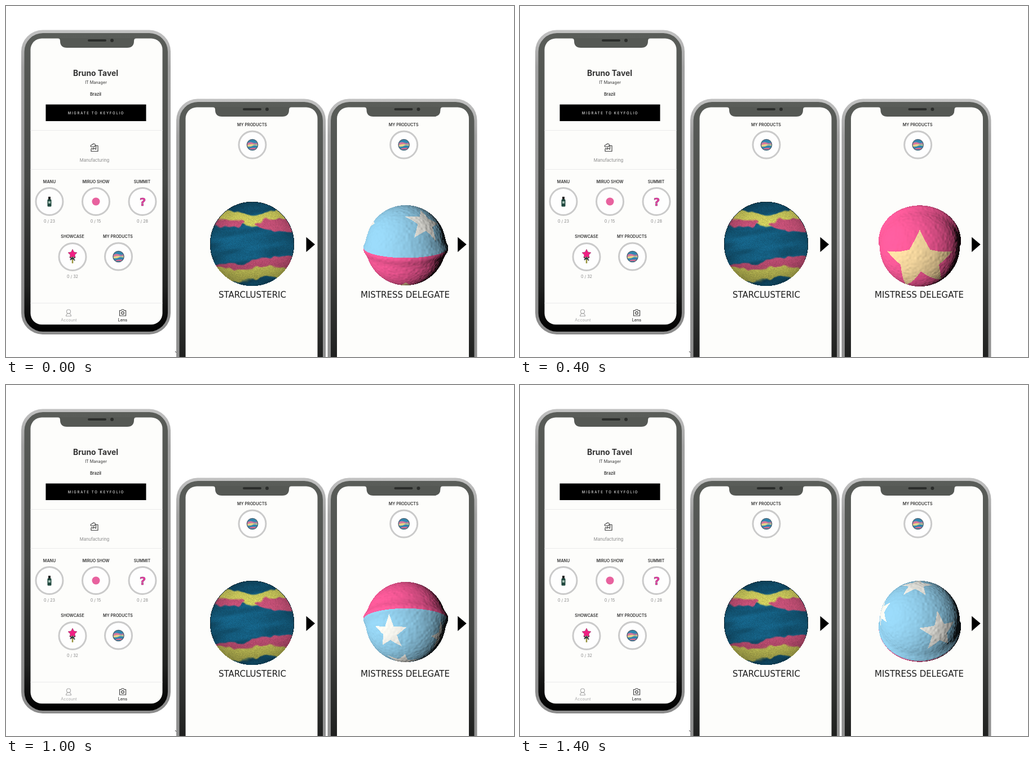
Recreate the animation shown at these times as an HTML page with a canvas. Size 901 by 622 pixels, loop 1600 ms.

```html
<!DOCTYPE html>
<html lang="en">
<head>
<meta charset="utf-8">
<title>Product lens</title>
<style>
html, body { margin: 0; width: 100%; height: 100%; overflow: hidden; background: #fff; }
svg, canvas, .window { position: absolute; left: 0; top: 0; }
text { font-family: Inter, Roboto, sans-serif; text-anchor: middle; fill: #333; font-size: 7.2px; }
.cap { font-weight: 600; font-size: 7.1px; }
.dim { fill: #888; }
.pale { fill: #aaa; }
.big { font: 15px "DejaVu Sans", sans-serif; fill: #1c1c1c; }
.ring { fill: #fefefe; stroke: #cacaca; stroke-width: 3; }
.rule { stroke: #ebebeb; }
.line { fill: none; stroke: #444; stroke-width: 1.2; stroke-linejoin: round; }
#still { left: 361px; top: 346px; }
.window { left: 629px; top: 341px; width: 160px; height: 160px; overflow: hidden; }
#strip { animation: spin 1.6s steps(8) infinite; }
@keyframes spin { to { transform: translateX(-1280px); } }
</style>
</head>
<body>
<svg width="901" height="622" viewBox="0 0 901 622">
  <defs>
    <linearGradient id="rim" x2="0" y2="1">
      <stop offset="0" stop-color="#c2c2c2"/><stop offset=".12" stop-color="#a2a2a2"/>
      <stop offset="1" stop-color="#8c8c8c"/>
    </linearGradient>
    <linearGradient id="body" x2="0" y2="1">
      <stop offset="0" stop-color="#5a5d59"/><stop offset=".5" stop-color="#454745"/>
      <stop offset=".85" stop-color="#202120"/><stop offset="1" stop-color="#000"/>
    </linearGradient>
    <g id="phone">
      <rect x="27" y="42.5" width="265" height="539.5" rx="38" fill="url(#rim)"/>
      <rect x="32.5" y="48" width="254.5" height="529" rx="33" fill="url(#body)"/>
      <rect x="43.500" y="57.500" width="234" height="507" rx="20" fill="#fdfdfb"/>
      <path d="M92 57H231Q227 57.500 227 62Q227 74 215 74H108Q96 74 96 62Q96 57.500 92 57Z" fill="#555854"/>
      <rect x="145" y="59" width="33" height="4" rx="2" fill="#2b2d2b"/>
      <circle cx="188" cy="61" r="3" fill="#2b2d2b"/>
    </g>
    <clipPath id="disc"><circle r="9.5"/></clipPath>
    <g id="mini">
      <circle class="ring" r="24"/>
      <g clip-path="url(#disc)">
        <rect x="-10" y="-10" width="20" height="20" fill="#3187b0"/>
        <path d="M-10-2Q-5-6 0-4T10-4V-1Q4-2 0-1T-10 1Z" fill="#d9789c"/>
        <path d="M-10 1Q-3-2 1-1T10-1V2Q3 0 0 2T-10 3Z" fill="#e3d58a"/>
        <path d="M-5 6.500Q0 4.500 7 5.500L5 8H-4Z" fill="#d0688f"/>
      </g>
      <circle r="9.7" fill="none" stroke="#4a6072" stroke-width="1.3"/>
    </g>
    <g id="shop">
      <text class="cap" x="436.5" y="213">MY PRODUCTS</text>
      <use href="#mini" x="437" y="246"/>
      <path d="M532.500 409.500L548 422.500L532.500 436Z"/>
    </g>
  </defs>

  <use href="#phone"/>
  <use href="#phone" x="275" y="122"/>
  <use href="#phone" x="543.5" y="122"/>
  <path d="M300 612L302 614" stroke="#222"/>

  <text x="159" y="124" style="font-size:13.85px;font-weight:700">Bruno Tavel</text>
  <text x="159.5" y="137.5" fill="#555">IT Manager</text>
  <text x="159" y="158.5" style="font-size:7.4px;font-weight:600">Brazil</text>
  <rect x="70.500" y="174.500" width="178" height="29.500"/>
  <text x="160" y="191.5" style="font-size:6px;letter-spacing:1.7px;fill:#ddd;font-weight:500">MIGRATE TO KEYFOLIO</text>
  <path class="rule" d="M43.500 220.500H277.500M43.500 289.500H277.500M43.500 526.500H277.500"/>
  <path class="line" d="M151 253V257.500H163V247.500H159.500V254L155 251.500V254L151 252M150.500 249.500Q149.500 246 153 246Q155 242.500 158.500 245.500M150.500 249.500H155Q158 249 159 246"/>
  <text class="dim" x="157" y="276" style="font-size:7.6px">Manufacturing</text>

  <text class="cap" x="77" y="313.5">MANU</text>
  <text class="cap" x="159.5" y="313.5">MIRUO SHOW</text>
  <text class="cap" x="241.5" y="313.5">SUMMIT</text>
  <circle class="ring" cx="77" cy="346.5" r="24"/>
  <circle class="ring" cx="159.5" cy="346.5" r="24"/>
  <circle class="ring" cx="242" cy="346.5" r="24"/>
  <rect x="75" y="338" width="4" height="5" fill="#222"/>
  <rect x="73.500" y="342.500" width="7" height="13" rx="1.5" fill="#20483f"/>
  <rect x="75" y="346" width="4" height="4" fill="#9dbbae"/>
  <circle cx="159.500" cy="346.500" r="7" fill="#e8629f"/>
  <text x="242.500" y="353.500" style="font:bold 20px 'DejaVu Sans',sans-serif;fill:#e93ba3;stroke:#7d3b68;stroke-width:.5px">?</text>
  <text class="dim" x="77" y="384">0 / 23</text>
  <text class="dim" x="159" y="384">0 / 15</text>
  <text class="dim" x="242" y="384">0 / 28</text>

  <text class="cap" x="118" y="411">SHOWCASE</text>
  <text class="cap" x="198.5" y="411">MY PRODUCTS</text>
  <circle class="ring" cx="118" cy="444.5" r="24"/>
  <use href="#mini" x="199.5" y="444"/>
  <path d="M118 442V456" stroke="#99953f" stroke-width="2.5"/>
  <path d="M113 445L118 448L123 445M114 450L118 446L122 451" fill="none" stroke="#343a40" stroke-width="2"/>
  <path d="M118 431L120.500 436L126 437L122 441L123 446L118 444L113 446L114 441L110 437L115.500 436Z" fill="#f01f83" stroke="#7a2350" stroke-width=".5"/>
  <text class="dim" x="118" y="482">0 / 32</text>

  <g class="line" style="stroke:#aaa"><circle cx="111" cy="541.5" r="3.5"/><path d="M106.500 549.500Q107 545 111 545T115.500 549.500Z"/></g>
  <g class="line"><path d="M201.500 539.500H204.500L205.500 538H208.500L209.500 539.500H212.500V549H201.500Z"/><circle cx="207" cy="544" r="2.3"/></g>
  <text class="pale" x="111.5" y="559">Account</text>
  <text x="207" y="559" style="font-weight:500">Lens</text>

  <use href="#shop"/>
  <use href="#shop" x="268.7"/>
  <text class="big" x="437" y="517">STARCLUSTERIC</text>
  <text class="big" x="708" y="517">MISTRESS DELEGATE</text>
</svg>
<canvas id="still" width="151" height="151"></canvas>
<div class="window"><canvas id="strip" width="1280" height="160"></canvas></div>

<script>
const { sin, cos, abs, sqrt, floor, hypot, max, min, exp, PI } = Math;
const rad = deg => deg * PI / 180;
const dot = (a, b) => a[0] * b[0] + a[1] * b[1] + a[2] * b[2];
const unit = a => { const l = hypot(...a); return a.map(v => v / l); };
const cross = (a, b) => [a[1] * b[2] - a[2] * b[1], a[2] * b[0] - a[0] * b[2], a[0] * b[1] - a[1] * b[0]];
const mix = (a, b, t) => a + (b - a) * t;

function hash(x, y, z) {
  const s = sin(x * 127.1 + y * 311.7 + z * 74.7) * 43758.5;
  return s - floor(s);
}
function noise(x, y, z) {
  const i = floor(x), j = floor(y), k = floor(z);
  const ease = t => t * t * (3 - 2 * t);
  const a = ease(x - i), b = ease(y - j), c = ease(z - k);
  const row = (m, n) => mix(hash(i, m, n), hash(i + 1, m, n), a);
  const face = n => mix(row(j, n), row(j + 1, n), b);
  return mix(face(k), face(k + 1), c);
}
function inside(poly, x, y) {
  let hit = false;
  for (let i = 0, j = poly.length - 1; i < poly.length; j = i++) {
    const [ax, ay] = poly[i], [bx, by] = poly[j];
    if (ay > y !== by > y && x < (bx - ax) * (y - ay) / (by - ay) + ax) hit = !hit;
  }
  return hit;
}
function paint(ctx, left, w, h, shade) {
  const img = ctx.createImageData(w, h);
  for (let y = 0; y < h; y++) for (let x = 0; x < w; x++) {
    const c = shade(x + .5, y + .5);
    if (c) img.data.set([c[0], c[1], c[2], 255], (y * w + x) * 4);
  }
  ctx.putImageData(img, left, 0);
}

// Banded ball: each band is [centre, half height] at x, from the top down
const TEAL = [20, 92, 126], YELLOW = [205, 203, 92], ROSE = [196, 80, 118];
const step = (a, b, x) => { const t = min(1, max(0, (x - a) / (b - a))); return t * t * (3 - 2 * t); };
const bands = [
  [x => -45 + 5 * sin((x + 20) * .07) - 2 * step(20, 50, x), x => 10 * (1 - step(58, 72, abs(x))), YELLOW],
  [x => mix(-37, -33, step(-30, 30, x)), x => max(6 * step(10, 25, -x), 10 * step(0, 25, x)), ROSE],
  [x => mix(43, 34, step(-20, 25, x)), x => mix(7, 11, step(-20, 25, x)), ROSE],
  [x => 53 + 4 * sin(x * .06 + 3), () => 10, YELLOW],
];
function banded(px, py) {
  const x = px - 75.5, y = py - 75.5, r = hypot(x, y);
  if (r > 74.8) return null;
  if (r > 74 && y < 30) return [16, 38, 50];
  const grain = hash(px, py, 3);
  const v = y + (noise(x / 8, y / 12, 1) - .5) * 7;
  let c = TEAL.map(n => n * (.82 + .28 * noise(x / 40, y / 8 + x / 50, 8)));
  for (const [mid, half, tint] of bands) {
    const h = half(x), k = h > 1 ? 1 - step(h - 2, h + 2, abs(v - mid(x))) : 0;
    c = c.map((n, i) => mix(n, tint[i], k));
  }
  const k = (.9 + .18 * grain) * (1.03 - .22 * (r / 75) ** 4) * (1 - .2 * step(0, 70, y));
  return c.map(n => n * k);
}
paint(still.getContext("2d"), 0, 151, 151, banded);

// Tumbling ball: two domes joined by a raised seam
const PINK = [255, 92, 156], BLUE = [150, 212, 242], WHITE = [250, 249, 242], CREAM = [255, 224, 165];
const light = unit([-.58, -.13, .8]);
const bigStar = [[0, -.76], [.18, -.49], [.62, -.34], [.35, -.2], [.455, .3],
  [.02, -.11], [-.31, .5], [-.35, -.2], [-.62, -.34], [-.18, -.49]];

function star(x, angle, size, twist) {
  const a = rad(angle), m = sqrt(1 - x * x);
  const c = [x, m * sin(a), m * cos(a)];
  const e1 = unit([1 - x * x, -x * c[1], -x * c[2]]);
  const poly = Array.from({ length: 10 }, (_, i) => {
    const r = i % 2 ? size * .43 : size, t = i * PI / 5 + rad(twist);
    return [r * sin(t), -r * cos(t)];
  });
  return { c, e1, e2: cross(c, e1), poly };
}
const stars = [star(-.3, 117, .34, -3), star(-.07, 166, .38, 8), star(.38, -132, .4, -4),
  star(-.83, -165, .34, 0), star(.74, 130, .32, 0)];

const field = p => {
  const l = hypot(...p), lat = p[2] / l;
  return l - .95 - .055 * exp(-((lat / .12) ** 2));
};
const rough = p => field(p) - .007 * noise(p[0] * 22 + 40, p[1] * 22 + 40, p[2] * 22 + 40);

function albedo(p) {
  const d = unit(p);
  if (d[2] > -.03) return p[2] > 0 && inside(bigStar, p[0], p[1]) ? CREAM : PINK;
  return stars.some(s => dot(d, s.c) > .7 && inside(s.poly, dot(d, s.e1), dot(d, s.e2))) ? WHITE : BLUE;
}

function tumbled(angle, shift) {
  const s = sin(rad(angle)), c = cos(rad(angle));
  const turn = ([x, y, z]) => [x, y * c - z * s, y * s + z * c];
  const lamp = turn(light), eye = turn([0, 0, 3]);
  return (px, py) => {
    const x = px - 80, y = py - 80 - shift;
    if (hypot(x, y) > 78) return null;
    const ray = turn(unit([x / 212, y / 212, -1]));
    let t = 1.9, p, gap = 1;
    for (let i = 0; i < 60 && t < 4 && gap > .002; i++) {
      p = eye.map((v, k) => v + ray[k] * t);
      gap = field(p);
      t += gap * .7;
    }
    if (gap > .004) return null;
    const f = rough(p), e = .012;
    const n = unit([0, 1, 2].map(k => {
      const q = p.slice();
      q[k] += e;
      return rough(q) - f;
    }));
    const lit = max(.004, dot(n, lamp));
    const k = min(1.04, 1.04 * sqrt(lit));
    return albedo(p).map(v => v * k);
  };
}

// Pole angle in degrees and vertical drift for each pose
const poses = [[104, 3], [70, 4], [35, 5], [-14, 0], [-61, -1], [-105, -1], [-161, 0], [145, -3]];
const ctx = strip.getContext("2d");
poses.forEach(([angle, shift], i) => paint(ctx, i * 160, 160, 160, tumbled(angle, shift)));
</script>
</body>
</html>
```
